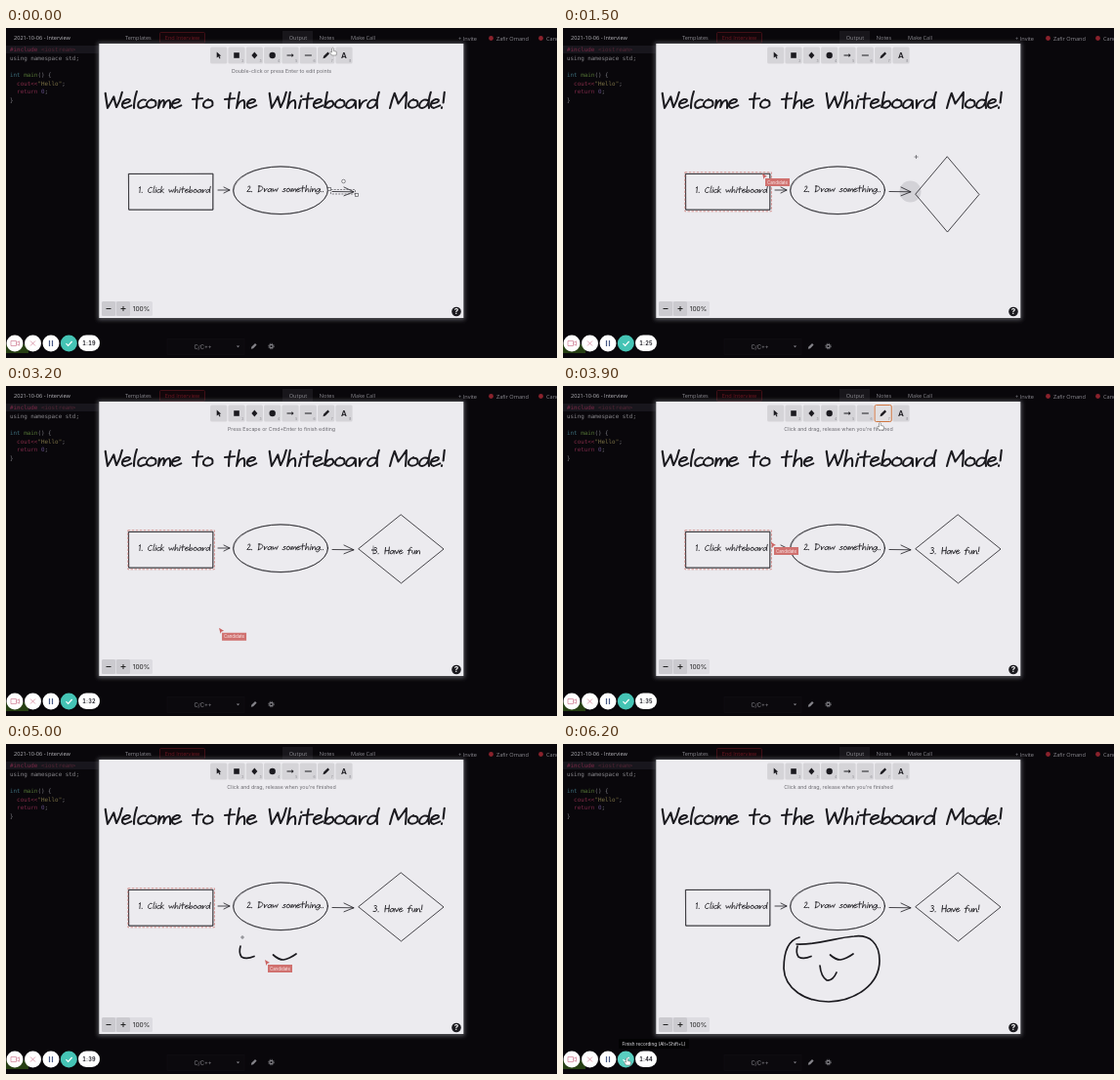
Recreate the animation shown at these times as an HTML page. Size 564 by 338 pixels, loop 6300 ms.

```html
<!DOCTYPE html>
<html lang="en">
<head>
<meta charset="utf-8">
<title>Whiteboard mode</title>
<style>
html, body { margin: 0; width: 100%; height: 100%; overflow: hidden; background: #09070b; }
svg { display: block; width: 564px; height: 338px; }
text { font-family: Inter, "Open Sans", sans-serif; white-space: pre; }
.code { opacity: .72; }
.code text { font: 5.9px "DejaVu Sans Mono", monospace; fill: #a9a9b0; }
.head text { font: 5.6px "Open Sans", sans-serif; fill: #8d8c92; }
.ink { fill: none; stroke: #1b1a1f; stroke-linecap: round; stroke-linejoin: round; }
.mid { text-anchor: middle; }
</style>
</head>
<body>
<svg viewBox="0 0 564 338">
  <defs>
    <filter id="glow" x="-10%" y="-10%" width="120%" height="120%"><feGaussianBlur stdDeviation="2"/></filter>
  </defs>
  <rect width="564" height="338" fill="#09070b"/>

  <g class="head">
    <text x="8" y="12" style="fill:#b4b3b8">2021-10-06 - Interview</text>
    <text x="122" y="12">Templates</text>
    <rect x="157.500" y="4.500" width="46" height="11" rx="1" fill="#12060a" stroke="#4d121a" stroke-width=".8"/>
    <text x="180.500" y="12" class="mid" style="fill:#6d1822">End Interview</text>
    <rect x="283" y="3" width="31" height="14" fill="#18161b"/>
    <text x="299" y="12" class="mid">Output</text>
    <text x="328.500" y="12" class="mid">Notes</text>
    <text x="365.500" y="12" class="mid">Make Call</text>
    <text x="463" y="12.500">+ Invite</text>
    <circle cx="496.500" cy="10.500" r="2.400" fill="#8a222c"/>
    <text x="502" y="12.500">Zafir Omand</text>
    <circle cx="547.500" cy="10.500" r="2.400" fill="#8a222c"/>
    <text x="553" y="12.500">Candidate</text>
  </g>

  <g class="code">
    <rect y="18" width="95" height="8" fill="#1f1d24"/>
    <text x="4" y="24"><tspan fill="#a8355f">#include</tspan> <tspan fill="#6b3045">&lt;iostream&gt;</tspan></text>
    <text x="4" y="32.500"><tspan fill="#b9b8bd">using namespace std;</tspan></text>
    <text x="4" y="50"><tspan fill="#4f93a3">int</tspan> <tspan fill="#6f9c45">main</tspan>() {</text>
    <text x="4" y="58.800">  <tspan fill="#b23a5e">cout&lt;&lt;</tspan><tspan fill="#a89a5c">"Hello"</tspan>;</text>
    <text x="4" y="67.200">  <tspan fill="#a8355f">return</tspan> <tspan fill="#7f64ae">0</tspan>;</text>
    <text x="4" y="75.600">}</text>
  </g>

  <rect x="94" y="15" width="375.500" height="284" fill="#55545a" filter="url(#glow)"/>
  <rect x="95.300" y="16" width="373" height="281" fill="#ecebef"/>
  <g id="tools"></g>
  <text id="hint" class="mid" x="282" y="46.300" font-size="5.300" fill="#6a696f"></text>

  <g id="board" class="ink" stroke-width=".8">
    <path d="M126 149.500L212 149.200L211.700 186.300L126 186Z"/>
    <path d="M125.600 149.200L211.600 149.600L212.200 186L126.200 186.500Z" stroke-width=".4"/>
    <ellipse cx="281" cy="166.200" rx="48.500" ry="24.300"/>
    <ellipse cx="281.200" cy="166.400" rx="48.200" ry="24.500" transform="rotate(-1 281 166)" stroke-width=".4"/>
    <path d="M217 166L229 166M223 163L229 166L223 169"/>
    <circle id="snap" cx="355.500" cy="167.500" r="11" fill="#d3d2d7" stroke="none"/>
    <path d="M334 167.500L356 167.800M346 163L356 167.800L346 171.800"/>
    <path id="diamond"/>
  </g>

  <g id="picked" fill="none" stroke="#55545a" stroke-width=".7">
    <rect x="332.500" y="165.500" width="25" height="4.500" stroke-dasharray="2 1.200"/>
    <rect x="329.500" y="163.500" width="3" height="3" fill="#fff"/>
    <rect x="357.500" y="169.500" width="3" height="3" fill="#fff"/>
    <circle cx="345.500" cy="157" r="1.800" fill="#fff"/>
  </g>
  <rect id="peerBox" x="124.800" y="147.800" width="88.600" height="40" fill="none" stroke="#cf7a78" stroke-width=".8" stroke-dasharray="2.500 1.500"/>
  <g id="face" class="ink" stroke-width="1.700"></g>

  <g id="zoom">
    <rect x="98" y="280" width="52" height="15" rx="1.500" fill="#dddce1"/>
    <rect x="98" y="280" width="14" height="15" rx="1.500" fill="#cbcacf"/>
    <rect x="113" y="280" width="14" height="15" rx="1.500" fill="#cbcacf"/>
    <path d="M102.500 287.500H107.500M117.500 287.500H122.500M120 285V290" stroke="#222" fill="none"/>
    <text x="138.500" y="290" class="mid" font-size="6.600" fill="#222">100%</text>
    <circle cx="461" cy="290.500" r="4.800" fill="#1b1a1f"/>
    <text x="461" y="293.300" class="mid" font-size="8" font-weight="700" fill="#fff">?</text>
  </g>

  <g id="peer">
    <path d="M0 0L5 3L2.500 3.700L1.500 6Z" fill="#c9605f"/>
    <rect x="3" y="5" width="25" height="8" fill="#d0716f"/>
    <text x="15.500" y="10.700" class="mid" font-size="4.400" fill="#fbeeee">Candidate</text>
  </g>

  <g id="footer">
    <rect x="165" y="318.500" width="79" height="16" fill="#0b090d" stroke="#121015" stroke-width=".6"/>
    <text x="201.500" y="328.500" class="mid" font-size="5.800" fill="#85848a">C/C++</text>
    <path d="M235.800 325.500H239.200L237.500 327.300Z" fill="#85848a"/>
    <path d="M250.800 328.700L251.400 326.600L255 323L256.600 324.600L253 328.200Z" fill="#85848a"/>
    <circle cx="271.500" cy="326" r="1.700" fill="none" stroke="#85848a" stroke-width="1.200"/>
    <circle cx="271.500" cy="326" r="2.800" fill="none" stroke="#85848a" stroke-width=".8" stroke-dasharray="1.200 1"/>
    <rect y="324" width="23" height="9" fill="#263f13"/>
    <g fill="#fff">
      <circle cx="9" cy="323" r="8.500"/><circle cx="27.500" cy="323" r="8.500"/><circle cx="46" cy="323" r="8.500"/>
      <rect x="74" y="314.500" width="22" height="16.500" rx="8.250"/>
    </g>
    <circle id="done" cx="64.300" cy="323" r="8.500"/>
    <g fill="none" stroke="#d58ca0" stroke-width=".8">
      <path d="M5 320.500H10.500V325.500H5ZM10.500 322.500L13.500 320.800V325.200L10.500 323.500M25 320.500L30 325.500M30 320.500L25 325.500"/>
      <path d="M44.500 320V326M47.500 320V326" stroke="#4b5b86" stroke-width="1.200"/>
      <path d="M61.500 323.200L63.600 325.300L67.600 321" stroke="#fff" stroke-width="1.200"/>
    </g>
    <text id="timer" x="85.200" y="325" class="mid" font-size="5.500" font-weight="700" letter-spacing=".4" style="font-variant-numeric:tabular-nums" fill="#24232b"></text>
    <g id="tip">
      <rect x="57" y="302" width="72" height="10" rx="1" fill="#020203"/>
      <text x="93" y="309" class="mid" font-size="4.700" fill="#e4e3e8">Finish recording (Alt+Shift+L)</text>
    </g>
  </g>

  <path id="cross" d="M-2 0H2M0 -2V2" stroke="#5a595f" stroke-width=".7"/>
  <path id="hand" d="M-1.500 4L-3.500 1Q-3 -.5 -1.500 1V-3Q-.5 -4.500 .3 -3V-.5L3 0Q4 1 3 4Z" fill="#fff" stroke="#555" stroke-width=".5"/>
</svg>

<script>
const LOOP = 6300, STEP = 100;
const $ = id => document.getElementById(id);

function add(parent, tag, attrs, text) {
  const el = document.createElementNS('http://www.w3.org/2000/svg', tag);
  for (const key in attrs) el.setAttribute(key, attrs[key]);
  if (text) el.textContent = text;
  return parent.appendChild(el);
}

// Hand lettering: one pen path per letter, cap line at 0, baseline at 18.
const bowl = 'M10 10Q4 6 1 13Q0 18 4 18Q9 17 10 10';
const arch = 'Q3 10 8 9Q10 10 10 18';
const dot = 'M2 17L2 18';
const capitals = {
  W: [19, 'M1 1Q3 10 5 18Q8 11 10 5Q12 12 14 17Q17 10 18 0'],
  M: [19, 'M1 18Q2 9 4 1Q7 8 9 13Q13 6 16 0Q17 9 17 18'],
  C: [13, 'M11 3Q6 -1 2 8Q0 18 6 18Q9 18 11 16'],
  D: [15, 'M3 1L3 18M1 2Q13 1 13 9Q11 17 2 18'],
  H: [13, 'M2 1V18M11 0V18M2 10L11 9'],
  1: [9, 'M2 4L5 1V18'],
  2: [10, 'M1 4Q5 -1 7 4Q7 9 0 17Q4 18 9 17'],
  3: [10, 'M1 2Q7 -1 7 4Q6 8 3 8Q9 9 8 14Q6 19 0 17'],
  '.': [5, dot], '!': [5, 'M3 0V12' + dot], ' ': [11, '']
};
const smalls = {
  a: [12, bowl + 'L11 18'],
  b: [12, 'M3 0L2 17Q4 9 9 10Q13 14 8 17Q5 19 2 16'],
  c: [9, 'M8 9Q4 7 1 12Q0 18 4 18L9 16'],
  d: [12, bowl + 'M11 0Q9 10 11 18'],
  e: [10, 'M1 13Q9 12 8 9Q5 6 1 11Q-1 17 4 18L10 15'],
  f: [9, 'M9 1Q4 -1 4 8L3 20M0 9L8 8'],
  g: [11, bowl + 'Q10 20 7 23Q4 25 1 22'],
  h: [12, 'M3 0L2 18' + arch],
  i: [5, 'M3 9L2 18M3 4V5'],
  k: [11, 'M3 0L2 18M9 8L3 13L10 18'],
  l: [6, 'M4 -1Q2 10 3 18'],
  m: [15, 'M2 9V18Q3 10 6 9Q8 10 7 17Q9 9 12 9Q14 11 14 18'],
  n: [11, 'M2 9V18' + arch],
  o: [11, 'M5 8Q-1 11 1 16Q5 20 10 15Q11 8 4 9'],
  r: [10, 'M2 9L3 18Q4 10 9 9'],
  s: [9, 'M7 9Q2 8 2 11Q8 14 7 16Q5 19 0 17'],
  t: [11, 'M5 1Q4 10 5 18M0 8L10 7'],
  u: [11, 'M2 9Q1 18 5 18Q8 17 9 9L10 18'],
  v: [10, 'M1 9L5 18L9 8'],
  w: [15, 'M1 9Q2 14 4 17L8 10Q9 15 11 17L14 8']
};
const letters = { ...capitals, ...smalls };

// The pen leans a little to the right and keeps letters low.
function write(text, x, y, scale = 1) {
  const group = add($('board'), 'g', {
    transform: `translate(${x} ${y}) scale(${scale}) matrix(1 0 -.1 .9 0 0)`,
    'stroke-width': 2.1, role: 'img', 'aria-label': text
  });
  let pen = 0;
  return [...text].map(ch => {
    const [width, d] = letters[ch];
    const el = add(group, 'path', { d, transform: `translate(${pen})` });
    pen += width;
    return el;
  });
}

write('Welcome to the Whiteboard Mode!', 100.8, 65.8);
write('1. Click whiteboard', 135.6, 162.3, 0.39);
write('2. Draw something..', 247.4, 161.2, 0.407);
const typed = write('3. Have fun!', 376.7, 165, 0.425);

const icons = [
  'M-2 -3.500L2.500 .5L.8 .8L1.800 3L.8 3.400L-.2 1.200L-2 2.500Z',
  'M-2.800 -2.800H2.800V2.800H-2.800Z',
  'M0 -3.500L3 0L0 3.500L-3 0Z',
  'M-3.200 0A3.200 3.200 0 1 1 3.200 0A3.200 3.200 0 1 1 -3.200 0Z',
  'M-3.500 -.5H1.500V-2L3.500 0L1.500 2V.5H-3.500Z',
  'M-3.500 -.5H3.500V.5H-3.500Z',
  'M-3.200 3.200L-2.500 .8L1.800 -3.400L3.400 -1.800L-.8 2.500Z'
];
const tools = Array.from({ length: 8 }, (_, i) => {
  const g = add($('tools'), 'g', { transform: `translate(${217.7 + i * 18.33} 28)` });
  const key = add(g, 'rect', { x: -8.6, y: -8.5, width: 17.2, height: 17, rx: 1.5 });
  const icon = i < 7
    ? add(g, 'path', { d: icons[i] })
    : add(g, 'text', { y: 2.9, class: 'mid', 'font-size': 8, 'font-weight': 600 }, 'A');
  if (i) add(g, 'text', { x: 5.2, y: 7, 'font-size': 3.4, fill: '#8b8a90' }, String(i + 1));
  return { key, icon };
});

const strokes = [
  [4300, 4500, 'M240 207Q238 214 241 218Q246 221 254 217.500'],
  [4600, 4800, 'M273.500 216Q279 221 284 221Q290 220 297 215'],
  [5000, 5500, 'M242 198C230 201 226 214 226 230C227 250 247 264 272 264C300 263 324 246 324 222C324 204 314 195 298 197C280 198 262 206 239 205'],
  [5600, 5800, 'M263 227Q264 238 270 242Q276 243 280 234']
].map(([from, to, d]) => {
  const el = add($('face'), 'path', { d });
  return { from, to, el, length: el.getTotalLength() };
});

const mousePath = [
  [0, 335, 24], [400, 256, 30], [600, 256, 30], [900, 356.5, 148], [1000, 361.5, 132],
  [1700, 361.5, 132], [2200, 376, 168], [3400, 376, 168], [3800, 325, 41], [4000, 325, 41],
  [4300, 240, 207], [4500, 254, 217.5], [4600, 273.5, 216], [4800, 297, 215], [5000, 242, 198.5],
  [5500, 239, 205], [5600, 263, 227], [5800, 280, 234], [6100, 66, 325]
];
const peerPath = [
  [1100, 240, 215], [1400, 204, 149], [1700, 204, 149], [2400, 219, 264],
  [3000, 219, 264], [3800, 213, 160], [4200, 213, 160], [5000, 265, 221], [5600, 285, 275]
];
const growth = [[1000, 0, 0], [1500, 65, 77], [1700, 87, 70]];

const hints = [
  [0, 'Double-click or press Enter to edit points'],
  [500, ''],
  [2200, 'Press Escape or Cmd+Enter to finish editing'],
  [3400, ''],
  [3800, "Click and drag, release when you're finished"]
];

const clamp = v => Math.max(0, Math.min(1, v));
const within = (t, from, to) => t >= from && t < to;
const show = (el, on) => { el.style.display = on ? '' : 'none'; };
const place = (el, [x, y]) => el.setAttribute('transform', `translate(${x} ${y})`);

function along(path, t) {
  const i = path.findIndex(p => p[0] > t);
  if (i === 0) return path[0].slice(1);
  if (i < 0) return path[path.length - 1].slice(1);
  const a = path[i - 1], b = path[i];
  const k = (t - a[0]) / (b[0] - a[0]), s = k * k * (3 - 2 * k);
  return [a[1] + (b[1] - a[1]) * s, a[2] + (b[2] - a[2]) * s];
}

function draw(t) {
  const seconds = Math.floor(79.5 + t * 0.00403);
  $('timer').textContent = `${Math.floor(seconds / 60)}:${String(seconds % 60).padStart(2, '0')}`;
  $('hint').textContent = hints.filter(h => h[0] <= t).pop()[1];

  const focus = within(t, 500, 1100) ? 2 : within(t, 3800, 4200) ? 6 : -1;
  tools.forEach(({ key, icon }, i) => {
    key.setAttribute('fill', i === focus ? '#e2e0e2' : '#d5d4d8');
    key.setAttribute('stroke', i === focus ? '#cf7640' : 'none');
    icon.setAttribute('fill', i === 5 && within(t, 2300, 2500) ? '#2f9a62' : '#1b1a1f');
  });

  show($('picked'), t < 500);
  show($('snap'), within(t, 1400, 1700));
  const [w, h] = along(growth, t), x = 361, y = 132;
  $('diamond').setAttribute('d',
    `M${x + w / 2} ${y}L${x + w} ${y + h / 2}L${x + w / 2} ${y + h}L${x} ${y + h / 2}Z`);
  show($('diamond'), t > 1000);
  typed.forEach((el, i) => show(el, t >= 2500 + i * 70));

  show($('peerBox'), within(t, 1400, 5700));
  show($('peer'), within(t, 1100, 5700));
  place($('peer'), along(peerPath, t));

  let mouse = along(mousePath, t);
  for (const { from, to, el, length } of strokes) {
    const drawn = length * clamp((t - from) / (to - from));
    show(el, drawn > 0);
    el.setAttribute('stroke-dasharray', `${drawn} ${length + 9}`);
    if (within(t, from, to)) {
      const p = el.getPointAtLength(drawn);
      mouse = [p.x, p.y];
    }
  }

  const pointing = t < 700 || within(t, 3700, 4100) || t >= 6000;
  show($('hand'), pointing);
  show($('cross'), !pointing);
  place($('hand'), mouse);
  $('cross').setAttribute('transform',
    `translate(${mouse}) scale(${within(t, 2200, 3400) ? '1 2.2' : '1'})`);
  show($('tip'), t >= 6100);
  $('done').setAttribute('fill', t >= 6100 ? '#59cfc0' : '#45c4b5');
}

const start = performance.now();
function tick() {
  const t = (performance.now() - start) % LOOP;
  draw(Math.floor(t / STEP) * STEP);
  requestAnimationFrame(tick);
}
tick();
</script>
</body>
</html>
```
